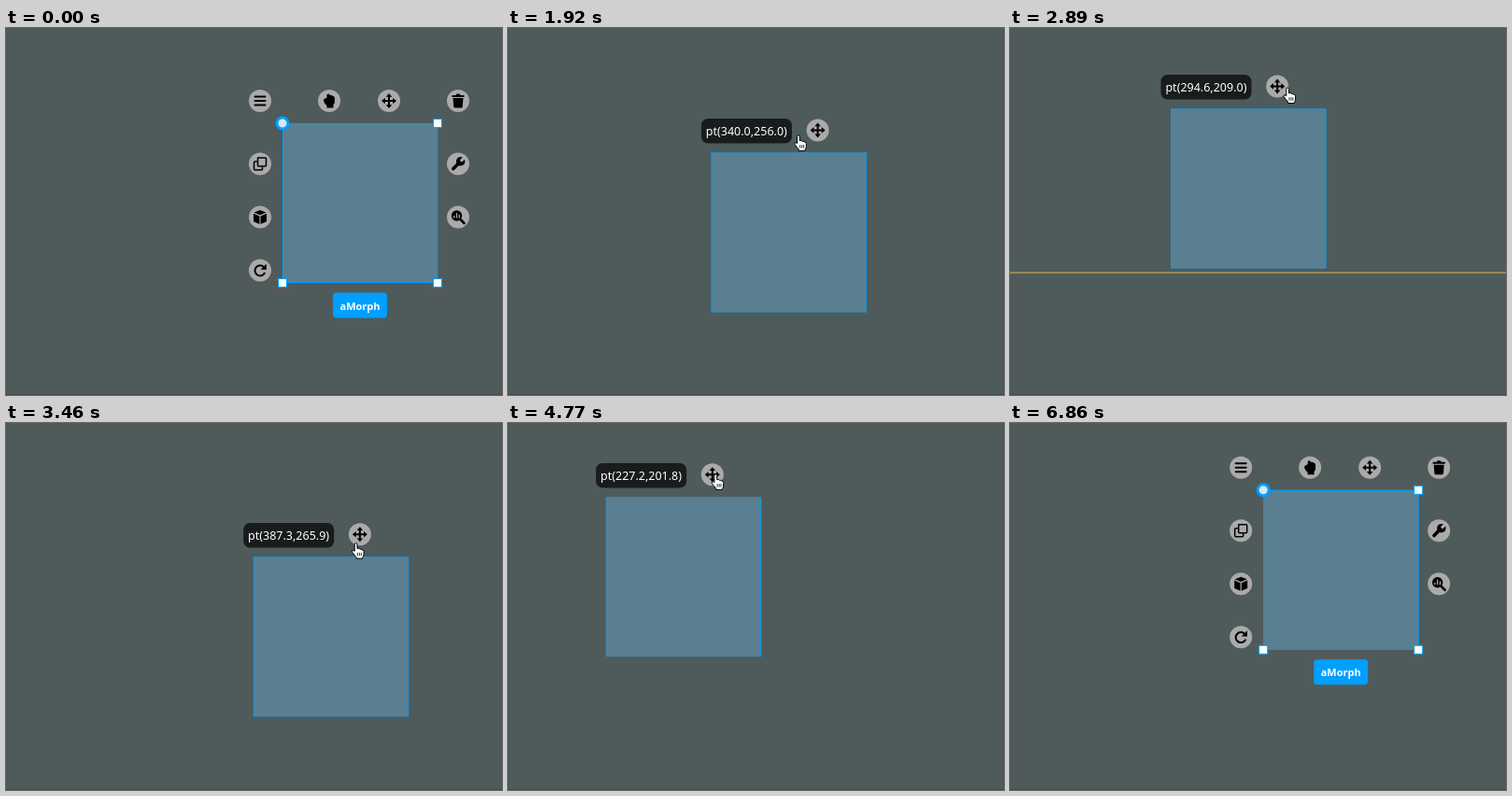
Animation of 531 by 393 pixels, one loop 7700 ms. Source, as an HTML page:

```html
<!DOCTYPE html>
<html lang="en">
<head>
<meta charset="utf-8">
<title>Dragging a morph by its halo</title>
<style>
html, body { margin: 0; width: 100%; height: 100%; overflow: hidden; background: #4f5b5b; }
svg { display: block; width: 531px; height: 393px; }
text { font-family: "Noto Sans", "Open Sans", sans-serif; fill: #fff; text-anchor: middle; }
.ln { fill: none; stroke: #000; stroke-width: 2; stroke-linecap: round; stroke-linejoin: round; }
.bt { fill: #aaa; }
.ed { stroke: #00a0ff; stroke-width: 1; }
.hd { fill: #fff; stroke: #00a0ff; }
.cur { fill: #fff; stroke: #000; stroke-linejoin: round; }
</style>
</head>
<body>
<svg viewBox="0 0 531 393">
  <rect width="531" height="393" fill="#4f5b5b"/>
  <rect y="392" width="531" height="1" fill="#414b4b"/>
  <rect id="guide" y="261.2" width="531" height="1.6" fill="#ac9356"/>
  <g id="morph">
    <rect width="166" height="171" fill="#5a7f90"/>
    <g id="edges">
      <path class="ed" d="M0 .5H166"/>
      <path class="ed" d="M166 0V171"/>
      <path class="ed" d="M0 170.5H166"/>
      <path class="ed" d="M.5 0V171"/>
    </g>
    <g id="halo">
      <rect class="hd" x="161.5" y="-4.5" width="9" height="9"/>
      <rect class="hd" x="-4.5" y="166.5" width="9" height="9"/>
      <rect class="hd" x="161.5" y="166.5" width="9" height="9"/>
      <circle r="6" fill="#d3e9f7" stroke="#00a0ff" stroke-width="3"/>
      <rect x="54" y="181.5" width="58" height="27" rx="4" fill="#00a0ff"/>
      <text x="83" y="199.5" font-size="11" font-weight="700">aMorph</text>
      <g transform="translate(-24 -24)">
        <circle class="bt" r="12"/>
        <path class="ln" d="M-5.5-4.5h11M-5.5 0h11M-5.5 4.5h11"/>
      </g>
      <g transform="translate(50 -24)">
        <circle class="bt" r="12"/>
        <path d="M-2.5-6q0-1.5 1.5-1.5t1.5 1.3l1.7.3q1.4-.3 1.7.8 2 0 2 1.8v4q0 2-1.5 3.5V7.5h-7V5Q-5 3-6 .5-6.5-2-4.5-2.5l2-1z"/>
      </g>
      <g transform="translate(188 -24)">
        <circle class="bt" r="12"/>
        <path d="M-6.5-6h4l1-1.5h3l1 1.5h4v2h-13zM-5.5-3h11L4.8 6q-.1 1.5-1.5 1.5h-6.6q-1.4 0-1.5-1.5z"/>
      </g>
      <g transform="translate(-24 43.5)">
        <circle class="bt" r="12"/>
        <path class="ln" style="stroke-width:1.5" d="M-2.5-6.5h8q1 0 1 1v7q0 1-1 1h-7q-1 0-1-1v-7q0-1 1-1M-4-2.5h-1.500q-1 0-1 1v7q0 1 1 1h7q1 0 1-1V4"/>
      </g>
      <g transform="translate(188 43.5)">
        <circle class="bt" r="12"/>
        <path class="ln" style="stroke-width:3.6" d="M-5.2 5.2 1.5-1.500"/>
        <path d="M4.800-7 2-4.200 2.300-2.300 4.200-2 7-4.800Q8.200-1 5.700 1 3.500 2.700.8 1.800L-1.800-.800Q-2.700-3.500-1-5.700 1-8.200 4.800-7z"/>
      </g>
      <g transform="translate(-24 100.5)">
        <circle class="bt" r="12"/>
        <path d="M0-7.500 6.500-5 0-2.300-6.500-5zM-7-3.700-.600-1V7.500L-7 4.800zM7-3.700.600-1V7.500L7 4.800z"/>
      </g>
      <g transform="translate(188 100.5)">
        <circle class="bt" r="12"/>
        <circle cx="-1.500" cy="-1.500" r="5.700"/>
        <path class="ln" style="stroke-width:2.6" d="M2.500 2.500 6.500 6.500"/>
        <path d="M-4.300-1.500v2.500M-1.500-4.500v5.500M1.300-2.700v3.700" stroke="#aaa" stroke-width="1.300"/>
      </g>
      <g transform="translate(-24 157.5)">
        <circle class="bt" r="12"/>
        <path class="ln" d="M4-3.500A5.500 5.500 0 1 0 4.800 3"/>
        <path d="M6.800-7V-.800H.600z"/>
      </g>
    </g>
    <g transform="translate(114 -24)">
      <circle class="bt" r="12"/>
      <path class="ln" d="M-5 0H5M0-5V5"/>
      <path d="M0-8 3.300-4.200H-3.300zM0 8 3.300 4.200H-3.300zM-8 0-4.200-3.300V3.300zM8 0 4.200-3.300V3.300z"/>
    </g>
    <g id="tip">
      <rect x="-10.700" y="-36.300" width="97" height="26.500" rx="7" fill="#181c1c"/>
      <text id="pt" x="37.700" y="-18" font-size="12.500"></text>
    </g>
  </g>
  <path id="arrow" class="cur" style="fill:#000;stroke:#fff" d="M1 .5V15l3.500-3.200L7 17l2.200-1L7 11h4.500z"/>
  <g id="hand">
    <path class="cur" d="M3.600 9.500V2.200a1.400 1.400 0 0 1 2.800 0V6.600q2.400-.8 2.700.7 2-.6 2.300.8 2-.3 2 1.400v3.500q0 2-1.400 3.600V17.300H5.300V15.800Q3.300 13.500 1 10.400q-.6-1.900 1-1.800z"/>
    <path d="M6.800 11v3.500M8.800 11v3.500M10.700 11v3.500" stroke="#000" stroke-width=".800"/>
  </g>
</svg>
<script>
const $ = id => document.getElementById(id);
const show = (id, on) => $(id).style.display = on ? '' : 'none';
const move = (id, x, y) => $(id).setAttribute('transform', `translate(${x} ${y})`);

const LOOP = 7700, STEP = 57.1, DRAG = 1498;
const OFF_X = 122.4, OFF_Y = 122.6;

// Drag path: step, then the point shown in the tooltip
const path = [
  [0, 418.4, 224.6], [3, 405, 230], [7, 340, 256], [10, 283, 263.5], [13, 237, 250],
  [14, 226.4, 245.4], [15, 224.9, 244], [18, 235, 228], [21, 259, 214],
  [24, 294.6, 209], [25, 307.6, 209.4], [27, 335, 214.6], [31, 378, 240],
  [35, 385, 274], [39, 347, 300], [43, 290.7, 304.3], [44, 276.7, 304],
  [49, 222, 265], [52, 208, 235], [55, 216, 210.6], [57, 227.2, 201.8],
  [58, 232.7, 200.3], [61, 256, 191], [65, 325, 189], [69, 391.5, 194], [70, 393.6, 194.4]
];

function slope(i, c) {
  const a = path[Math.max(i - 1, 0)], b = path[Math.min(i + 1, path.length - 1)];
  return (b[c] - a[c]) / (b[0] - a[0]);
}

// Cubic Hermite curve through the path
function point(k) {
  k = Math.min(Math.max(k, 0), 70);
  const i = Math.max(path.findIndex(p => p[0] >= k) - 1, 0);
  const a = path[i], b = path[i + 1], d = b[0] - a[0], u = (k - a[0]) / d;
  return [1, 2].map(c =>
    a[c] + (b[c] - a[c]) * u * u * (3 - 2 * u) +
    d * u * (1 - u) * ((1 - u) * slope(i, c) - u * slope(i + 1, c)));
}

// Strength of the top, right, bottom and left edge
function edges(k) {
  if (k < 0) return [1, .4, 1, 1];
  if (k >= 70) return [1, 1, .6, .3];
  if (k >= 56 && k <= 58) return [.25, 1, .25, .25];
  return [.8, .8, .8, .8];
}

function cursor(k) {
  if (k < -6) {
    const u = 1 - (k + 20) / 13, e = u * u * (3 - 2 * u);
    return [412 + 23 * e, 86 + 261 * e];
  }
  if (k < -4) return [412 - 3 * (k + 7), 86 - 2.3 * (k + 7)];
  if (k >= 90) {
    const u = (k - 89) / 4;
    return [378 + 103 * u, 49 + 327 * u ** 1.5];
  }
  // The pointer runs one step ahead of the morph
  const [x, y] = point(k + 1);
  return [x - OFF_X + 107, y - OFF_Y - 23.6];
}

function frame(now) {
  const t = now % LOOP, k = Math.floor((t - DRAG) / STEP);
  const dragging = t >= 1510 && t < 5990;
  const [px, py] = point(k), x = px - OFF_X, y = py - OFF_Y;

  move('morph', x, y);
  edges(k).forEach((v, i) => $('edges').children[i].style.opacity = v);
  show('halo', !dragging);
  show('tip', dragging);
  $('pt').textContent = `pt(${px.toFixed(1)},${py.toFixed(1)})`;
  show('guide', dragging && Math.abs(y + 171 - 262) < 8);

  const [cx, cy] = cursor(k), seen = t >= 360 && t < 6860, over = k >= -7 && k < 90;
  show('hand', seen && over);
  show('arrow', seen && !over);
  move(over ? 'hand' : 'arrow', cx, cy);
  requestAnimationFrame(frame);
}
requestAnimationFrame(frame);
</script>
</body>
</html>
```
